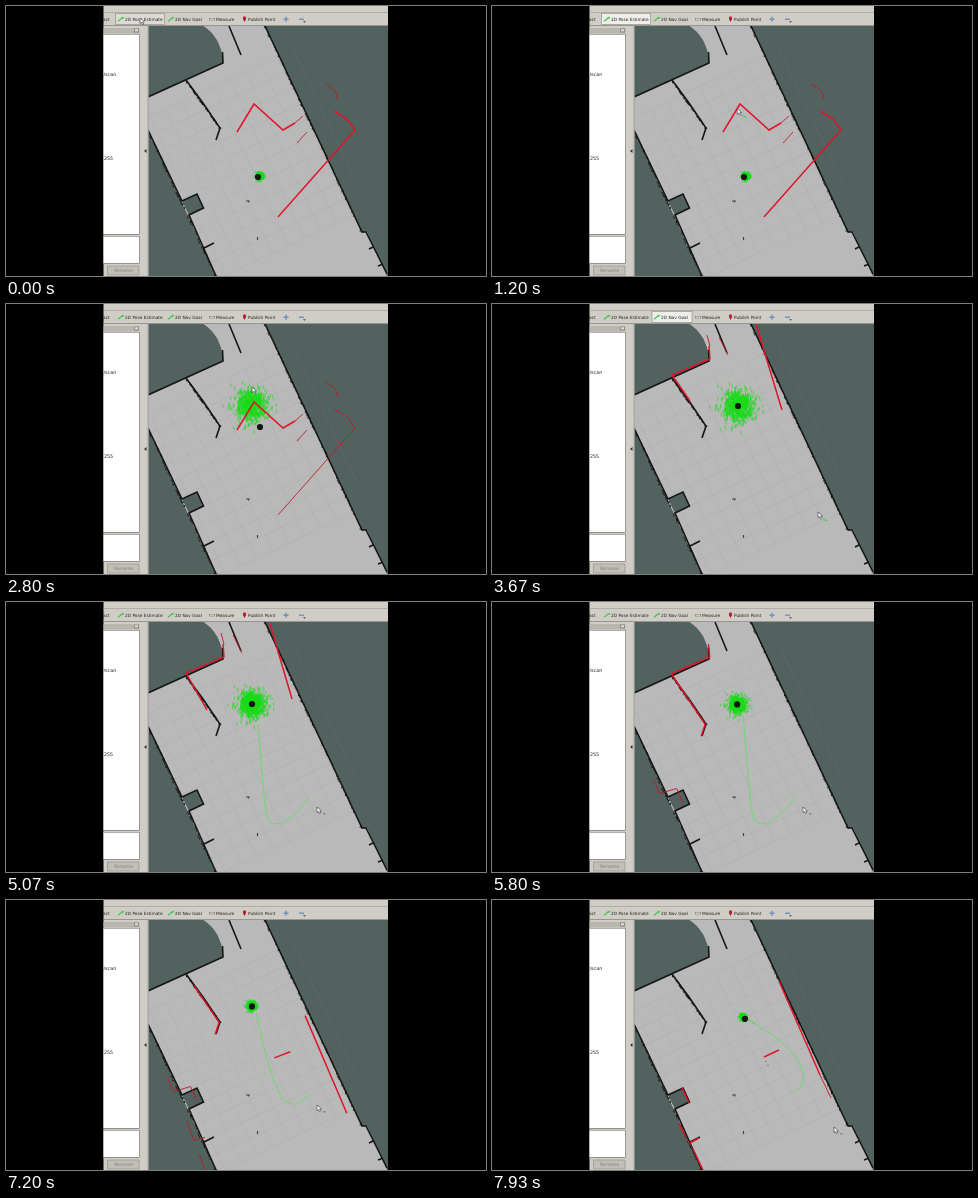
Animation of 480 by 270 pixels, one loop 8 s. Source, as an HTML page with a canvas:

```html
<!DOCTYPE html>
<html lang="en">
<head>
<meta charset="utf-8">
<title>Robot localisation and navigation</title>
<style>
  html, body { margin: 0; width: 100%; height: 100%; overflow: hidden; background: #000; }
  canvas { display: block; width: 480px; height: 270px; filter: blur(.35px); }
</style>
</head>
<body>
<canvas id="stage" width="480" height="270"></canvas>
<script>
const ctx = document.getElementById('stage').getContext('2d');
const LOOP = 8000, STEP = 1000 / 15;
const GREEN = '#16dc16', RED = '#e0142a';
const PANEL = '#d0cdc6', UNKNOWN = '#52625f', FLOOR = '#b9b9b9';

function rect(x, y, w, h, color) {
  ctx.fillStyle = color;
  ctx.fillRect(x, y, w, h);
}
function stroke(d, color, width) {
  ctx.strokeStyle = color;
  ctx.lineWidth = width;
  ctx.stroke(new Path2D(d));
}
function fill(d, color) {
  ctx.fillStyle = color;
  ctx.fill(new Path2D(d));
}
function disc(x, y, r, color) {
  ctx.fillStyle = color;
  ctx.beginPath();
  ctx.arc(x, y, r, 0, 7);
  ctx.fill();
}
function label(text, x, y, size = 4.3, color = '#222') {
  ctx.font = `${size}px "DejaVu Sans", sans-serif`;
  ctx.fillStyle = color;
  ctx.fillText(text, x, y);
}
function randomSource(seed) {
  return () => (seed = (seed * 16807) % 2147483647) / 2147483647;
}
const mix = (a, b, k) => a + (b - a) * k;
const progress = (t, from, to) => Math.min(1, Math.max(0, (t - from) / (to - from)));

// Position along a list of [time, x, y] keys.
function along(keys, t) {
  let i = 0;
  while (i < keys.length - 2 && t >= keys[i + 1][0]) i++;
  const [t0, x0, y0] = keys[i], [t1, x1, y1] = keys[i + 1];
  const k = progress(t, t0, t1);
  return [mix(x0, x1, k), mix(y0, y1, k)];
}

const POSE_SELECT = 500, POSE_PRESS = 1450, POSE_SET = 2000, POSE_SEEN = 2950;
const NAV_SELECT = 3350, GOAL_PRESS = 4530, GOAL_SET = 4870;

const cursorKeys = [
  [0, 134, 12], [870, 135, 12], [1130, 245, 103], [1450, 246, 101], [1850, 247, 83],
  [2900, 246, 83], [3200, 180, 13], [3450, 180, 13], [3660, 326, 208], [4300, 330, 212],
  [4500, 303, 196], [4560, 303, 196], [4820, 311, 205], [7780, 311, 205], [7930, 342, 227], [8000, 343, 227]
];
const robotKeys = [
  [0, 252, 171], [POSE_SET, 252, 171], [POSE_SET, 254, 123], [POSE_SEEN, 254, 123],
  [POSE_SEEN, 246, 102], [5270, 246, 102], [6500, 244, 103], [7000, 244, 103], [8000, 253.6, 120]
];

// Laser readings: start time, turn in radians per second, strong and faint traces.
const farWall = 'M328 105L341 113L349 124L272 211';
const nearWall = 'M231 126L248 98L277 124L289 117';
const scatter = 'M289 117L297 110M291 137L301 126M319 78L326 82L331 88V93';
const doorway = 'M217 42L218 55L180 71';
const jambs = 'M215 31L218 42M227 33L236 51';
const innerWall = 'M180 72L213 122L209 134';
const leftBox = 'M161 177L167 191L184 186L190 200';
const lowerLeft = 'M180 221L187 240L198 237M192 254L198 270';
const scans = [
  [0, 0, nearWall + farWall, scatter],
  [2650, 0, nearWall, scatter + farWall],
  [POSE_SEEN, 0, doorway + 'L198 97M264 20L290 106', jambs],
  [4400, 0, doorway + 'L201 108M264 22L286 97', jambs],
  [5270, -.12, doorway + 'L204 108M264 24L282 84', 'M227 33L236 51'],
  [5670, -.06, doorway + innerWall, leftBox],
  [6070, -.04, doorway + innerWall, leftBox + lowerLeft],
  [6300, 0, innerWall + 'M267 158L283 152M305 134L331 201', leftBox + lowerLeft + 'M331 201L343 232'],
  [6950, -.03, 'M188 85L213 122L209 134M268 158L284 152M299 116L340 214', leftBox + lowerLeft],
  [7350, -.02, 'M270 158L286 151M292 96L340 202M190 189L197 203', 'M187 223L211 270M198 242L207 238'],
  [7700, 0, 'M272 157L287 150M287 81L328 175M190 188L197 203M187 223L193 236M198 243L207 238M201 249L211 270',
    'M328 175L339 198M193 236L201 249M274 161v1M276 165v1']
];

const firstRoute = [[251, 113], [255, 160], [258, 195], [261, 217], [267, 223], [284, 219], [303, 196]];
const lastRoute = [[249, 114], [263, 124], [282, 136], [298, 149], [308, 164], [314, 178], [307, 190]];

const rand = randomSource(71);
const gauss = () => Math.sqrt(-2 * Math.log(rand())) * Math.cos(2 * Math.PI * rand());
const particles = Array.from({ length: 750 }, () => ({
  x: gauss(), y: gauss(), angle: -Math.PI / 2 + gauss() * .35
}));

function drawGrid() {
  ctx.save();
  ctx.translate(245, 160);
  ctx.rotate(-.442);
  let d = '';
  for (let i = -5; i <= 5; i++) {
    const p = i * 17.6;
    d += `M${p} -88V88M-88 ${p}H88`;
  }
  stroke(d, 'rgba(95,102,102,.11)', .6);
  stroke('M88 -88V60', 'rgba(150,160,155,.15)', .7);
  ctx.restore();
}

function drawMap() {
  rect(142, 20, 240, 250, UNKNOWN);
  fill('M197 20Q215 31 217 57L142 91V124L210 270H381L361 226H356L259 20Z', FLOOR);
  fill('M176 195L191 188L198 202L183 209Z', UNKNOWN);
  drawGrid();
  stroke('M197 20Q215 31 217 57', '#555d5b', .7);
  stroke('M216.5 46L217 57L142 91M142 124L176 195L191 188L197.5 202L183 209L210 270M198 242L208 237' +
    'M180 74L197 97L214 122L210 134M223 20L235 49M259 20L356 226H360L381 268M363 243L367 241M372 260L377 258',
    '#161616', 1.6);
  // Ragged outline of the long walls.
  const ragged = randomSource(9);
  for (let i = 0; i < 90; i++) {
    const k = ragged(), off = ragged() * 2 - 1.5;
    rect(mix(259, 356, k) + off, mix(20, 226, k), 1, 1.5, '#181818');
    rect(mix(142, 210, k) + off, mix(124, 270, k), 1, 1.5, '#181818');
    rect(mix(180, 214, k) + off, mix(74, 122, k), 1, 1, '#181818');
  }
  stroke('M240 195H244M242 196H243M251.5 231V234', '#444', 1.2);
}

function drawScan(t, [rx, ry]) {
  const [start, turn, strong, faint] = scans.filter(s => s[0] <= t).pop();
  ctx.save();
  ctx.translate(rx, ry);
  ctx.rotate(turn * (t - start) / 1000);
  ctx.translate(-rx, -ry);
  stroke(faint, '#bd1c2b', .9);
  stroke(strong, RED, 1.5);
  ctx.restore();
}

function drawParticles(t, [rx, ry]) {
  let spread = 1.6, cx = rx + 1.8, cy = ry - .8;
  if (t >= POSE_SET) {
    spread = t < 4400 ? 7.9 : mix(6.8, 2.6, progress(t, 5270, 6300));
    spread = mix(spread, 1.3, progress(t, 6900, 7700));
    cx = t < POSE_SEEN ? 245 : rx - 2 * progress(t, 7000, 7900);
    cy = t < POSE_SEEN ? 101 : ry - 2 * progress(t, 7000, 7900);
  }
  const size = spread > 5 ? 3.6 : 2.2;
  let d = '';
  for (const p of particles) {
    const x = cx + p.x * spread, y = cy + p.y * spread + size / 2;
    d += `M${x} ${y}l${Math.cos(p.angle) * size} ${Math.sin(p.angle) * size}`;
  }
  stroke(d, GREEN, .65);
}

function drawRoute(t, robot) {
  if (t < GOAL_SET + 60) return;
  const k = progress(t, 6950, 7700);
  const points = firstRoute.map(([x, y], i) => [mix(x, lastRoute[i][0], k), mix(y, lastRoute[i][1], k)]);
  if (t < 5270) points[0] = [252, 122];
  let d = 'M' + points[0];
  for (let i = 1; i < points.length - 1; i++) {
    const [x, y] = points[i], [nx, ny] = points[i + 1];
    const last = i === points.length - 2;
    d += `Q${x} ${y} ${last ? nx : (x + nx) / 2} ${last ? ny : (y + ny) / 2}`;
  }
  stroke(d, '#70d96a', 1);
  if (k > .5) stroke(`M${robot[0] - 4} ${robot[1] - 5}L${points[1]}`, '#40d940', 1);
}

function drawGoalArrow(x, y, [tx, ty]) {
  ctx.save();
  ctx.translate(x, y);
  ctx.rotate(Math.atan2(ty - y, tx - x));
  fill('M0 -1.4H14V-3.5L21 0L14 3.5V1.4H0Z', GREEN);
  ctx.restore();
}

function drawCursor(t, [x, y]) {
  const toolActive = (t > POSE_SELECT && t < POSE_PRESS) || (t > NAV_SELECT && t < GOAL_PRESS);
  if (y > 24 && toolActive) stroke(`M${x + 5} ${y + 7}l4 2`, '#35d84a', 1.2);
  else if (t > GOAL_SET) stroke(`M${x + 6} ${y + 6}l2 2m0 -2v1`, '#77807c', 1);
  const d = `M${x} ${y}V${y + 5.6}l1.4 -1.1l1 2.1l1.2 -.6l-1 -2h1.8Z`;
  fill(d, '#fff');
  stroke(d, '#333', .6);
}

function button(x, w, hovered, selected) {
  if (!hovered && !selected) return;
  rect(x, 7.5, w, 11, selected ? '#efeeeb' : '#dcdad4');
  ctx.strokeStyle = '#96938d';
  ctx.lineWidth = .7;
  ctx.strokeRect(x, 7.5, w, 11);
}

function drawToolbar(t, [mx, my]) {
  rect(97.5, 0, 284.5, 20, PANEL);
  rect(97.5, 6, 284.5, .8, '#aaa7a1');
  rect(97.5, 19, 284.5, 1, '#989690');
  button(109.5, 49, my < 19 && mx < 159, t >= POSE_SELECT && t < POSE_SET);
  button(160, 40, my < 19 && mx > 159 && mx < 200, t >= NAV_SELECT && t < GOAL_SET);
  label('act', 97, 14.8);
  label('2D Pose Estimate', 119, 14.8);
  label('2D Nav Goal', 169, 14.8);
  label('Measure', 210, 14.8);
  label('Publish Point', 242, 14.8);
  for (const x of [112, 162]) {
    stroke(`M${x} 15.3L${x + 4.5} 11.8`, '#3cc647', 1.1);
    fill(`M${x + 6} 10.8l-2.8 .5l2 2Z`, '#3cc647');
  }
  rect(203, 12, 6, 2.4, '#8a877e');
  rect(203.8, 12.6, 4.4, 1.2, '#dedacb');
  disc(238.5, 12, 1.7, '#c32032');
  fill('M237 13H240L238.5 16Z', '#a31828');
  stroke('M277.5 13.2H282.5M280 10.7V15.7', '#6f90c0', 1.4);
  stroke('M293 13.2H298', '#6f90c0', 1.4);
  fill('M297 15.2H300L298.5 16.7Z', '#444');
}

function drawSidePanel() {
  rect(97.5, 20, 45, 250, PANEL);
  rect(97.5, 22, 36, 5.5, '#b9b6b0');
  rect(128, 22.5, 5, 4, '#8f8c86');
  rect(129, 23.3, 3, 2, '#e2e0db');
  for (const [y, h] of [[28, 200], [230, 27]]) {
    rect(97.5, y, 35.5, h, '#fff');
    rect(97.5, y, 36, .7, '#8d8b87');
    rect(133, y, .8, h, '#8d8b87');
    rect(97.5, y + h, 36, .9, '#8d8b87');
  }
  label('/scan', 97.5, 69.5, 4.8);
  label('255', 98, 154, 4.8);
  rect(101.5, 260, 31.5, 9, '#c2bfb8');
  stroke('M101.5 260H133V269H101.5Z', '#96938e', .7);
  label('Rename', 108, 266.3, 4.7, '#85827d');
  rect(141.7, 20, .8, 250, '#8f908c');
  fill('M140.5 143V147L138 145Z', '#333');
}

function draw(t) {
  const robot = along(robotKeys, t), cursor = along(cursorKeys, t);
  rect(0, 0, 480, 270, '#000');
  ctx.save();
  ctx.beginPath();
  ctx.rect(142, 20, 240, 250);
  ctx.clip();
  drawMap();
  drawRoute(t, robot);
  drawParticles(t, robot);
  drawScan(t, robot);
  disc(...robot, 3.1, '#141414');
  if (t >= POSE_PRESS && t < POSE_SET) drawGoalArrow(246, 101, cursor);
  if (t >= GOAL_PRESS && t < GOAL_SET) drawGoalArrow(303, 196, cursor);
  ctx.restore();
  drawToolbar(t, cursor);
  drawSidePanel();
  drawCursor(t, cursor);
}

function frame(now) {
  draw(Math.floor((now % LOOP) / STEP + .06) * STEP);
  requestAnimationFrame(frame);
}
requestAnimationFrame(frame);
</script>
</body>
</html>
```
